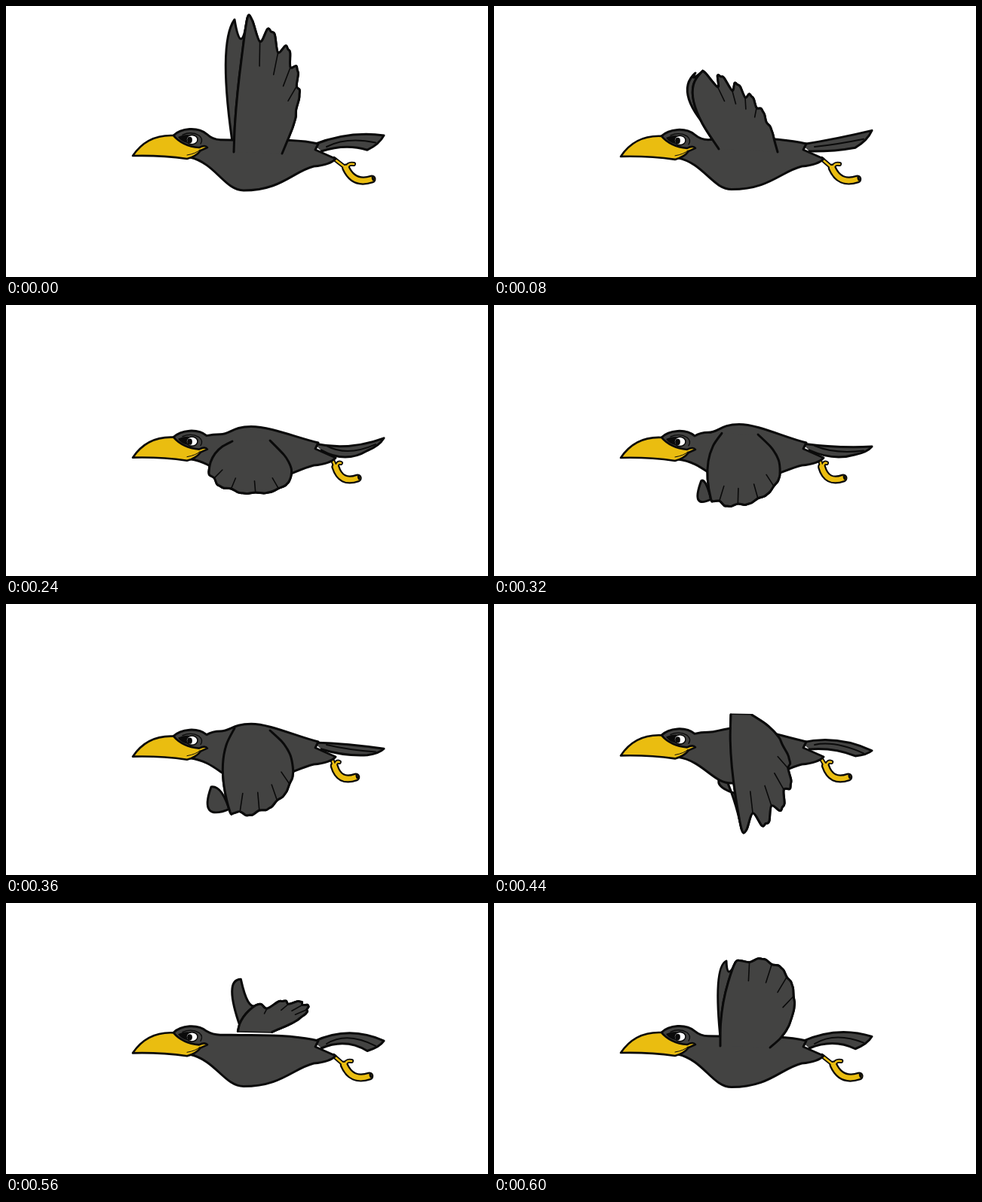
Animation of 639x360 px, one loop 0.64 s. Source, as an HTML page with a canvas:

```html
<!DOCTYPE html>
<html>
<head>
<meta charset="utf-8">
<title>Flying bird</title>
<style>
html, body { margin: 0; width: 100%; height: 100%; overflow: hidden; background: #fff }
canvas { display: block }
</style>
</head>
<body>
<canvas id="stage" width="639" height="360"></canvas>
<script>
const ctx = document.getElementById('stage').getContext('2d');
const LOOP = 640, STEP = 40, FEATHERS = 6;
const INK = '#0a0a0a', GREY = '#434342', GOLD = '#eabd10';

// near: root, leading bend, tip, two trailing bends, rear root
// far: bend and tip of the wing behind; notch: depth between feathers
const poses = [
  { t: 0, near: '302,194 303,125 320,16 393,48 408,108 366,196', far: '280,50 303,18', notch: 26 },
  { t: 80, near: '298,190 243,115 275,88 330,95 363,131 376,194', far: '236,116 267,89', notch: 22 },
  { t: 160, near: '340,204 285,206 271,163 300,160 385,165 378,196', far: '268,185 280,163', notch: 14 },
  { t: 240, near: '300,181 270,193 269,222 275,268 445,262 350,180', far: '272,235 280,215', notch: 4 },
  { t: 360, near: '303,165 275,205 297,276 345,300 425,225 350,168', far: '255,290 272,243', notch: 5 },
  { t: 400, near: '306,163 285,230 304,350 360,345 420,250 358,165', far: '285,350 290,300', notch: 26 },
  { t: 480, near: '322,131 334,190 353,250 440,255 430,130 326,130', far: '285,135 318,150', notch: 20 },
  { t: 600, near: '300,190 298,130 320,79 400,50 425,150 366,192', far: '290,85 308,77', notch: 5 }
];
for (const pose of poses)
  for (const part of ['near', 'far'])
    pose[part] = pose[part].split(' ').map(p => p.split(',').map(Number));

const lerp = (a, b, k) => a.map ? a.map((v, i) => lerp(v, b[i], k)) : a + (b - a) * k;

// Point on a Bezier curve with any number of control points
const bezier = (pts, u) => pts.length === 1 ? pts[0]
  : bezier(pts.slice(1).map((p, i) => lerp(pts[i], p, u)), u);

function poseAt(t) {
  const i = poses.findLastIndex(p => p.t <= t);
  const a = poses[i], b = poses[i + 1] || a;
  const k = (t - a.t) / (b.t - a.t || 1);
  return { near: lerp(a.near, b.near, k), far: lerp(a.far, b.far, k), notch: lerp(a.notch, b.notch, k) };
}

// Smooth open curve through all points
function smooth(pts) {
  const at = i => pts[Math.max(0, Math.min(pts.length - 1, i))];
  let d = 'M' + pts[0];
  for (let i = 0; i < pts.length - 1; i++) {
    const [p, q, r, s] = [at(i - 1), at(i), at(i + 1), at(i + 2)];
    d += `C${q.map((v, j) => v + (r[j] - p[j]) / 6)} ${r.map((v, j) => v - (s[j] - q[j]) / 6)} ${r}`;
  }
  return d;
}

function stroke(d, width, color = INK) {
  ctx.lineWidth = width;
  ctx.strokeStyle = color;
  ctx.stroke(new Path2D(d));
}

function shape(d, fill, width = 3) {
  ctx.fillStyle = fill;
  ctx.fill(new Path2D(d));
  if (width) stroke(d, width);
}

function oval(x, y, rx, ry, fill, width) {
  shape(`M${x - rx} ${y}a${rx} ${ry} 0 1 0 ${2 * rx} 0a${rx} ${ry} 0 1 0 ${-2 * rx} 0`, fill, width);
}

// Leading edge, then a trailing edge cut into feathers that fade out toward the root
function nearWing({ near, notch }) {
  const [root, bend, tip, , , rear] = near;
  const hub = lerp(root, rear, 0.5), trailing = near.slice(2);
  const edge = [0, 0.25, 0.5, 0.75].map(u => bezier([root, bend, tip], u));
  let quills = '';
  for (let i = 0; i < FEATHERS; i++) {
    const u = i / FEATHERS, mid = u + 0.5 / FEATHERS;
    if (i) edge.push(bezier(trailing, u - 0.03));
    edge.push(bezier(trailing, u), bezier(trailing, u + 0.03));
    const outer = bezier(trailing, mid);
    const reach = Math.hypot(outer[0] - hub[0], outer[1] - hub[1]);
    const cut = lerp(outer, hub, notch * (1 - mid) ** 1.5 / reach);
    edge.push(cut);
    if (i < 4) quills += `M${cut}L${lerp(cut, hub, 0.22)}`;
  }
  return { outline: smooth([...edge, rear]), quills };
}

function farWing({ near: [root, bend, tip], far: [farBend, farTip] }, wave) {
  const start = lerp(root, tip, wave(0.5, 0.5, 320));
  return `M${start}Q${farBend} ${farTip}Q${lerp(bend, tip, 0.5)} ${tip}Z`;
}

function drawFoot(wave) {
  const x = (mid, swing) => wave(mid, swing, 0);
  const ankle = x(442.5, 8), toeX = x(474, 11);
  const leg = `M${x(433, 2)} 203L${ankle} 215`;
  const toe = `M${ankle} 215Q${x(451, 10)} 238 ${toeX} 230`;
  const spur = `M${ankle + 1} 217Q${ankle + 2} 208 ${x(451, 10)} 210`;
  for (const [color, thin, thick] of [[INK, 6, 11], [GOLD, 2.5, 6.5]]) {
    stroke(leg + spur, thin, color);
    stroke(toe, thick, color);
  }
  stroke(`M${toeX + 1} 228l1 3`, 3);
}

function drawTail(wave) {
  const bend = wave(178, 16, 250), tip = wave(180, -15, 102), low = wave(195, -7, 102);
  shape(`M408 184Q455 ${bend} 501 ${tip}Q495 ${(tip + low) / 2 + 2} 479 ${low}Q450 ${bend + 17} 418 193`, GREY);
  stroke(`M425 187Q452 ${bend + 8} 490 ${(tip + low) / 2}`, 2);
}

function drawTrunk(wave, drop) {
  const neck = wave(173.5, 4.5, 40), back = wave(168.5, 10, 0), belly = wave(240, 5, 0);
  shape(`M222 ${172 + drop}C232 ${162 + drop} 254 ${160 + drop} 266 ${170 + drop}
    Q274 ${neck} 284 ${neck}C298 ${neck} 300 ${back} 325 ${back}S385 176 414 183L410 191L437 203
    Q430 211 408 213C380 220 365 ${belly} 315 ${belly}
    C290 ${belly} 278 209 244 ${201 + drop}Z`, GREY);
}

function drawFace(drop) {
  ctx.save();
  ctx.translate(0, drop);
  shape('M222 172C200 171 182 178 168 199Q205 198 240 203Q252 200 258 192L267 188Q264 184 256 188Q234 186 222 172Z', GOLD, 2.6);
  stroke('M240 198Q252 196 257 191', 1);
  shape('M228 174Q234 171 242 171L240 182Q232 180 228 174Z', INK, 0);
  oval(246.5, 177.5, 7.5, 6.2, '#fff', 1.6);
  oval(243.5, 178, 3.4, 4.2, INK, 0);
  stroke('M234 171Q246 166 256 172Q262 177 258 183', 1.3);
  ctx.restore();
}

function draw(now) {
  const t = Math.floor(now % LOOP / STEP) * STEP;
  const wave = (mid, swing, peak) => mid + swing * Math.cos(2 * Math.PI * (t - peak) / LOOP);
  const pose = poseAt(t), drop = wave(2, 2, 300);
  const { outline, quills } = nearWing(pose);
  ctx.fillStyle = '#fff';
  ctx.fillRect(0, 0, 639, 360);
  ctx.lineJoin = ctx.lineCap = 'round';
  shape(farWing(pose, wave), GREY);
  drawFoot(wave);
  drawTail(wave);
  shape(outline + 'Z', GREY); // closes the shoulder where it rises above the back
  drawTrunk(wave, drop);
  drawFace(drop);
  shape(outline, GREY);
  stroke(quills, 1.6);
}

const start = performance.now();
function tick() {
  draw(performance.now() - start);
  requestAnimationFrame(tick);
}
tick();
</script>
</body>
</html>
```
